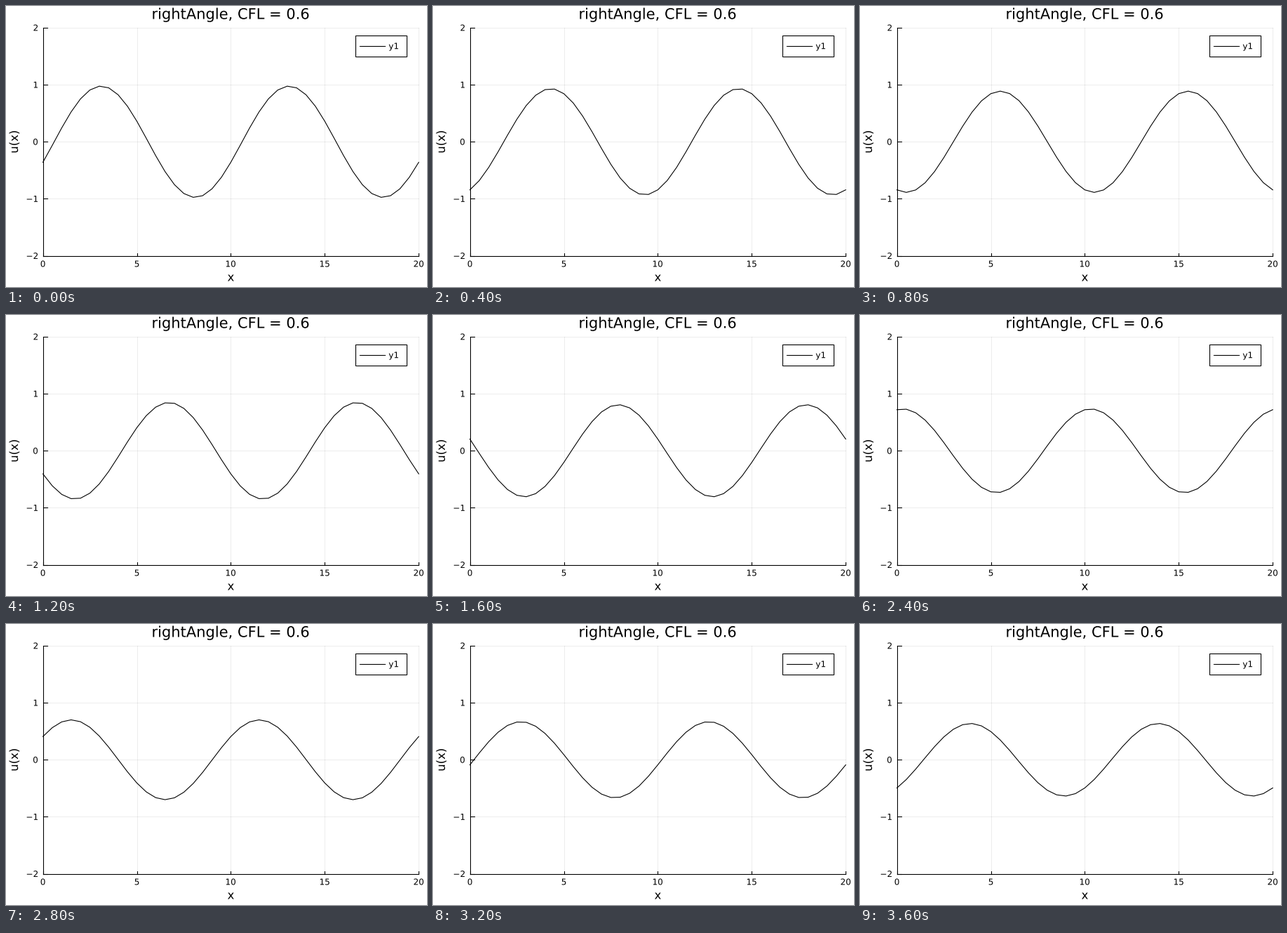
Write a matplotlib script that moves like this. It is 600 px wide and 400 px high and loops after 3.8 s.

```python
import numpy as np
import matplotlib.pyplot as plt
from matplotlib.animation import FuncAnimation
from matplotlib.patches import PathPatch, Rectangle
from matplotlib.textpath import TextPath
from matplotlib.transforms import Affine2D

W, H = 600, 400
LEFT, RIGHT, TOP, BOTTOM = 52.6, 588.2, 30.9, 355.6
MID_X, MID_Y = (LEFT + RIGHT) / 2, (TOP + BOTTOM) / 2
FRAMES, INTERVAL = 19, 200
CFL, DX, PERIOD, STEPS = 0.6, 0.5, 10, 2
LW = 1.1 * 0.72
FONT = {"family": "DejaVu Sans"}

fig = plt.figure(figsize=(W / 100, H / 100), dpi=100, facecolor="white")
ax = fig.add_axes([0, 0, 1, 1])
ax.set(xlim=(0, W), ylim=(H, 0))
ax.axis("off")


def px(x):
    return LEFT + (RIGHT - LEFT) * x / 20


def py(u):
    return MID_Y - (BOTTOM - TOP) * u / 4


def line(x0, y0, x1, y1, **style):
    ax.plot([x0, x1], [y0, y1], **{"color": "black", "lw": LW, **style})


def label(text, x, y, size, align=0.5, angle=0):
    """Place text by its inked width, with its baseline at y."""
    path = TextPath((0, 0), text, size=size, prop=FONT)
    box = path.get_extents()
    shift = -(box.x0 + align * box.width)
    place = Affine2D().translate(shift, 0).scale(1, -1).rotate_deg(-angle).translate(x, y)
    ax.add_patch(PathPatch(place.transform_path(path), fc="black", lw=0, zorder=4))


def wave(step):
    """Upwind advection of a sine: each step damps and shifts it."""
    x = np.arange(0, 20 + DX / 2, DX)
    k = 2 * np.pi / PERIOD
    gain = 1 - CFL * (1 - np.exp(-1j * k * DX))
    return px(x), py((gain ** step * np.exp(1j * k * x)).imag)


grid = dict(alpha=0.07, lw=0.72)
for x in range(0, 21, 5):
    line(px(x), TOP, px(x), BOTTOM, **grid)
    line(px(x), BOTTOM, px(x), BOTTOM - 3.9)
    label(str(x), px(x), 371.3, 12)
for u in range(-2, 3):
    line(LEFT, py(u), RIGHT, py(u), **grid)
    line(LEFT, py(u), LEFT + 6.4, py(u))
    label(str(u).replace("-", "\u2212"), 45, py(u) + 4.4, 12, align=1)
line(LEFT, TOP, LEFT, BOTTOM)
line(LEFT, BOTTOM, RIGHT, BOTTOM)

label("rightAngle, CFL = 0.6", MID_X, 18.5, 21)
label("x", MID_X, 391.5, 16.5)
label("u(x)", 17, MID_Y, 16.5, angle=90)

curve, = ax.plot([], [], color="black", lw=LW, solid_joinstyle="round")

ax.add_patch(Rectangle((497.7, 41.6), 72.9, 30.3, fc="white", ec="black", lw=LW, zorder=3))
line(503.7, 56.8, 539.5, 56.8, zorder=4)
label("y1", 552.3, 61.2, 12)


def draw(i):
    curve.set_data(*wave(STEPS * (i + 1)))
    return curve,


anim = FuncAnimation(fig, draw, frames=FRAMES, interval=INTERVAL, repeat=True, repeat_delay=0)
plt.show()
```
